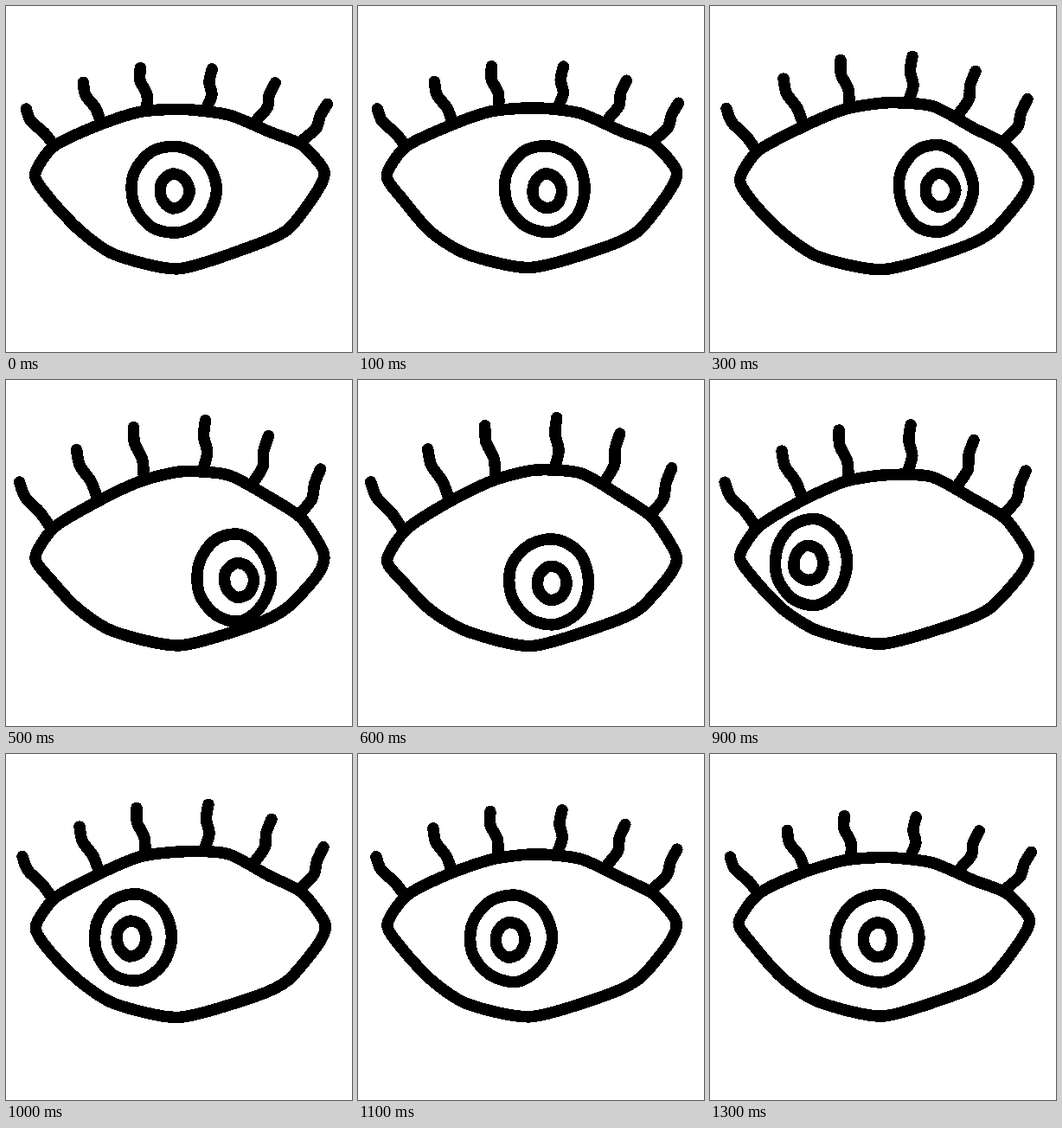
Recreate the animation shown at these times as an HTML page. Size 400 by 400 pixels, loop 1400 ms.

```html
<!DOCTYPE html>
<html lang="en">
<head>
<meta charset="utf-8">
<title>Rolling eye</title>
<style>
  html, body { margin: 0; width: 100%; height: 100%; overflow: hidden; background: #fff; }
  svg { display: block; width: 100vw; height: 100vh; }
  path {
    fill: none; stroke: #000; stroke-width: 13.5;
    stroke-linecap: round; stroke-linejoin: round; shape-rendering: crispEdges;
  }
</style>
</head>
<body>
<svg viewBox="0 0 400 400">
  <path id="lid"/>
  <path id="lashes"/>
  <path id="iris"/>
  <path id="pupil"/>
</svg>
<script>
const STEP = 100, STEPS = 14;

// The lid at rest, corner to corner
const UPPER = [[56, 162], [105, 138], [155, 122], [205, 119], [257, 125], [305, 146], [342, 161]];
const LOWER = [[368, 190], [361, 214], [326, 258], [286, 278], [200, 303],
               [126, 287], [85, 260], [52, 224], [34, 195]];

// Each lash at rest: tip, root
const LASHES = [
  [[23, 119], [55, 161]], [[89, 88], [109, 133]], [[155, 71], [163, 116]],
  [[238, 72], [232, 117]], [[311, 88], [290, 131]], [[371, 113], [343, 155]],
];

// Where the eye looks: step, x, y
const GAZE = [[0, 194, 212], [3, 261, 211], [5, 264, 229], [7, 179, 236],
              [9, 117, 210], [11, 176, 213], [13, 193, 213], [14, 194, 212]];

const $ = id => document.getElementById(id);
const lerp = (a, b, k) => a + (b - a) * k;

function random(seed) {
  let s = seed * 7919 + 17;
  return () => (s = s * 16807 % 2147483647) / 2147483647;
}

// Smooth line through points; bend sets how round it runs
function curve(pts, closed, bend) {
  const n = pts.length;
  const pt = i => pts[closed ? (i + n) % n : Math.max(0, Math.min(n - 1, i))];
  let d = "M" + pt(0);
  for (let i = 0; i < (closed ? n : n - 1); i++) {
    const [a, b, c, e] = [pt(i - 1), pt(i), pt(i + 1), pt(i + 2)];
    const out = b.map((v, j) => v + (c[j] - a[j]) * bend);
    const into = c.map((v, j) => v - (e[j] - b[j]) * bend);
    d += `C${out} ${into} ${c}`;
  }
  return closed ? d + "Z" : d;
}

// Vertical travel of the open lid at x: the corners sink, the right of the arch rises
const across = x => Math.max(0, Math.min(1, (x - 34) / 336));
const upperShift = x => 11 - 28 * Math.sin(Math.PI * across(x) ** 1.6);
const lowerShift = x => 4 + 8 * (2 * across(x) - 1) ** 4;

function gazeAt(step) {
  const i = GAZE.findIndex(g => g[0] > step);
  const [t0, x0, y0] = GAZE[i - 1], [t1, x1, y1] = GAZE[i];
  const k = (step - t0) / (t1 - t0);
  return [lerp(x0, x1, k), lerp(y0, y1, k)];
}

function lash([tip, root], lift) {
  const shift = upperShift(root[0]) * lift;
  const a = [tip[0] - 8 * lift, tip[1] + shift - 11 * lift];
  const b = [root[0] - 4 * lift, root[1] + shift];
  const curl = (root[0] - 200) / 45;
  const along = (k, dx) => [lerp(a[0], b[0], k) + dx, lerp(a[1], b[1], k)];
  return curve([a, along(1 / 3, curl - 2), along(2 / 3, curl + 3), b], false, 0.14);
}

function draw(step) {
  const rnd = random(step + 1);
  const jitter = size => (rnd() - 0.5) * size;
  const lift = 0.5 + 0.55 * Math.cos(2 * Math.PI * (step - 6.5) / STEPS);

  const moved = shift => ([x, y]) => [x + jitter(2), y + shift(x) * lift + jitter(2)];
  const lid = [...UPPER.map(moved(upperShift)), ...LOWER.map(moved(lowerShift))];
  $("lid").setAttribute("d", curve(lid, true, 0.12));
  $("lashes").setAttribute("d", LASHES.map(l => lash(l, lift)).join(""));

  const ring = (cx, cy, rx, ry, n, rough) => curve(Array.from({ length: n }, (_, i) => {
    const a = 2 * Math.PI * i / n, r = 1 + jitter(rough);
    return [cx + rx * r * Math.cos(a), cy + ry * r * Math.sin(a)];
  }), true, 0.16);

  const [x, y] = gazeAt(step), side = x - 190;
  $("iris").setAttribute("d", ring(x, y, 49 - 0.09 * Math.abs(side), 50, 9, 0.05));
  $("pupil").setAttribute("d", ring(x + 1 + 0.06 * side, y + 2, 17, 20, 7, 0.08));
}

let shown = -1;
function tick() {
  const step = Math.floor(performance.now() / STEP) % STEPS;
  if (step !== shown) draw(shown = step);
  requestAnimationFrame(tick);
}
tick();
</script>
</body>
</html>
```
